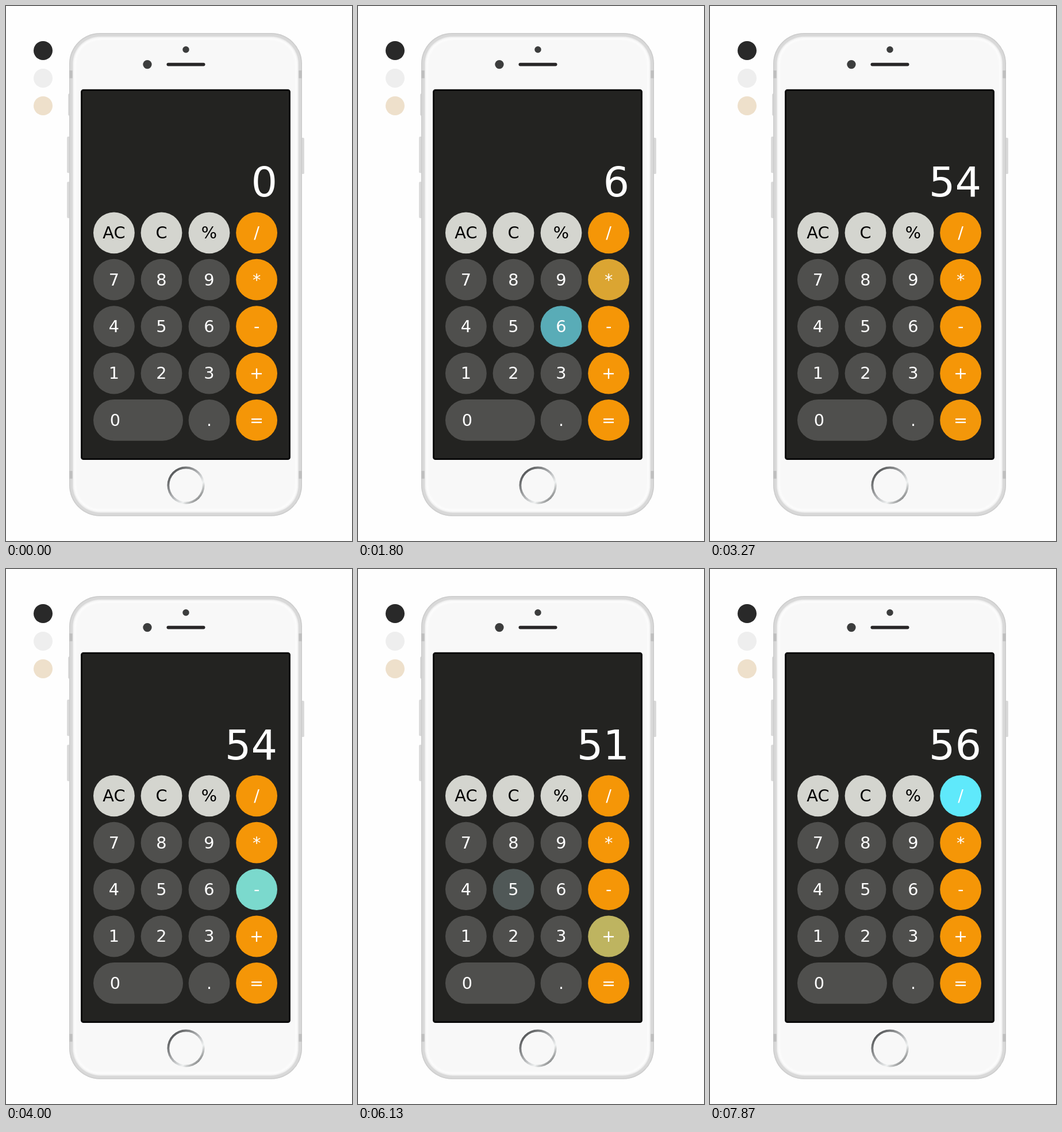
Recreate the animation shown at these times as an HTML page. Size 602x930 px, loop 8 s.

```html
<!DOCTYPE html>
<html lang="en">
<head>
<meta charset="utf-8">
<title>Calculator</title>
<style>
  html, body { margin: 0; width: 100%; height: 100%; overflow: hidden; background: #fefefe; }
  body { position: relative; }
  .dot { position: absolute; left: 48px; width: 33px; height: 33px; border-radius: 50%; }
  .phone {
    position: absolute; left: 110px; top: 47px; width: 423px; height: 877px;
    transform: scale(.9575); transform-origin: 0 0;
    background: #d9d9d9; border-radius: 56px; box-shadow: inset 0 0 3px rgba(0,0,0,.2);
  }
  .phone div, .home::before { position: absolute; }
  .bar { left: 0; width: 100%; height: 14px; background: #bfbfbf; }
  .face { inset: 6px; border-radius: 50px; background: #f8f8f8; box-shadow: inset 0 0 3px rgba(0,0,0,.2); }
  .gloss { inset: 8px; border-radius: 48px; box-shadow: inset 0 0 3px rgba(0,0,0,.1), inset 0 0 6px 3px #fff; }
  .side { left: -4px; width: 4px; height: 66px; border-radius: 2px 0 0 2px; background: #d9d9d9; }
  .mute { left: -2px; width: 2px; height: 40px; }
  .sleep { left: 423px; border-radius: 0 2px 2px 0; }
  .lens { border-radius: 50%; background: #3c3d3d; }
  .speaker { left: 177px; top: 54px; width: 70px; height: 6px; border-radius: 6px; background: #292728; }
  .screen { left: 24px; top: 105px; width: 375px; height: 667px; border-radius: 2px; background: #232321; box-shadow: 0 0 0 3px #060606; }
  .home {
    left: 177.5px; bottom: 22px; width: 68px; height: 68px; border-radius: 50%;
    background: linear-gradient(135deg, #303233, #b5b7b9 50%, #f0f2f2 69%, #303233);
  }
  .home::before { content: ""; inset: 4px; border-radius: 50%; background: #f8f8f8; }
  svg { position: absolute; left: 0; top: 0; }
  text { font: 28.72px "DejaVu Sans", sans-serif; text-anchor: middle; fill: #fff; }
  #display { font-size: 71.8px; text-anchor: end; }
</style>
</head>
<body>
<div class="dot" style="top:61px;background:#292929"></div>
<div class="dot" style="top:109px;background:#eee"></div>
<div class="dot" style="top:157px;background:#eee0cb"></div>

<div class="phone">
  <div class="side mute" style="top:110px"></div>
  <div class="side" style="top:188px"></div>
  <div class="side" style="top:270px"></div>
  <div class="side sleep" style="top:190px"></div>
  <div class="bar" style="top:68px"></div>
  <div class="bar" style="bottom:68px"></div>
  <div class="face"></div>
  <div class="gloss"></div>
  <div class="lens" style="left:205.5px;top:24px;width:12px;height:12px"></div>
  <div class="lens" style="left:134px;top:49px;width:16px;height:16px"></div>
  <div class="speaker"></div>
  <div class="screen"></div>
  <div class="home"></div>
</div>

<svg id="calc" width="602" height="930" viewBox="0 0 602 930">
  <text id="display" x="472.2" y="330.6">0</text>
</svg>

<script>
const LOOP = 8000, FADE = 1000;
const SIZE = 71.8;
const LIGHT = [212, 213, 207], DARK = [79, 79, 77], ORANGE = [245, 150, 7], HOVER = [95, 233, 251];
const COLS = [152, 234.6, 317.6, 400.2];
const ROWS = [['AC', 'C', '%', '/'], ['7', '8', '9', '*'], ['4', '5', '6', '-'], ['1', '2', '3', '+'], ['0', '', '.', '=']];

// Pointer visits: key, enter, leave, click, display after the click
const VISITS = [
  ['9', 370, 870, 650, '9'],
  ['*', 875, 1400, 1100, '9'],
  ['6', 1450, 1980, 1750, '6'],
  ['=', 2290, 2700, 2550, '54'],
  ['-', 3490, 4130, 3850, '54'],
  ['3', 4230, 4735, 4550, '3'],
  ['+', 5150, 5810, 5500, '51'],
  ['5', 6060, 6700, 6400, '5'],
  ['/', 6890, LOOP, 7300, '56']
];

const calc = document.getElementById('calc');
const display = document.getElementById('display');
const keys = {};

function add(tag, attrs) {
  const el = document.createElementNS('http://www.w3.org/2000/svg', tag);
  for (const name in attrs) el.setAttribute(name, attrs[name]);
  return calc.appendChild(el);
}

const rgb = c => `rgb(${c.map(Math.round)})`;

ROWS.forEach((row, r) => row.forEach((label, c) => {
  if (!label) return;
  const x = COLS[c], y = 358.4 + 81.4 * r;
  const color = c === 3 ? ORANGE : r ? DARK : LIGHT;
  const width = label === '0' ? 156 : SIZE;
  const shape = add('rect', { x, y, width, height: SIZE, rx: SIZE / 2, fill: rgb(color) });
  const text = add('text', { x: x + (label === '0' ? 37.9 : SIZE / 2), y: y + SIZE / 2 + 9.9 });
  text.textContent = label;
  if (color === LIGHT) text.style.fill = '#000';
  keys[label] = { shape, color };
}));

// CSS "ease": cubic-bezier(.25, .1, .25, 1)
function ease(x) {
  if (x <= 0) return 0;
  if (x >= 1) return 1;
  const bez = (a, b, s) => 3 * a * s * (1 - s) ** 2 + 3 * b * s * s * (1 - s) + s ** 3;
  let lo = 0, hi = 1;
  for (let i = 0; i < 20; i++) {
    const mid = (lo + hi) / 2;
    if (bez(.25, .25, mid) < x) lo = mid; else hi = mid;
  }
  return bez(.1, 1, lo);
}

// An interrupted fade reverses in proportionally less time
function glow(t, enter, leave) {
  if (t < leave) return ease((t - enter) / FADE);
  const peak = ease((leave - enter) / FADE);
  return peak * (1 - ease((t - leave) / (FADE * peak)));
}

function draw(now) {
  const t = now % LOOP;
  let shown = '0';
  for (const [label, enter, leave, click, value] of VISITS) {
    const { shape, color } = keys[label];
    const k = glow(t, enter, leave);
    shape.setAttribute('fill', rgb(color.map((v, i) => v + (HOVER[i] - v) * k)));
    if (t >= click) shown = value;
  }
  if (display.textContent !== shown) display.textContent = shown;
}

const start = performance.now();
function tick() {
  draw(performance.now() - start);
  requestAnimationFrame(tick);
}
tick();
</script>
</body>
</html>
```
